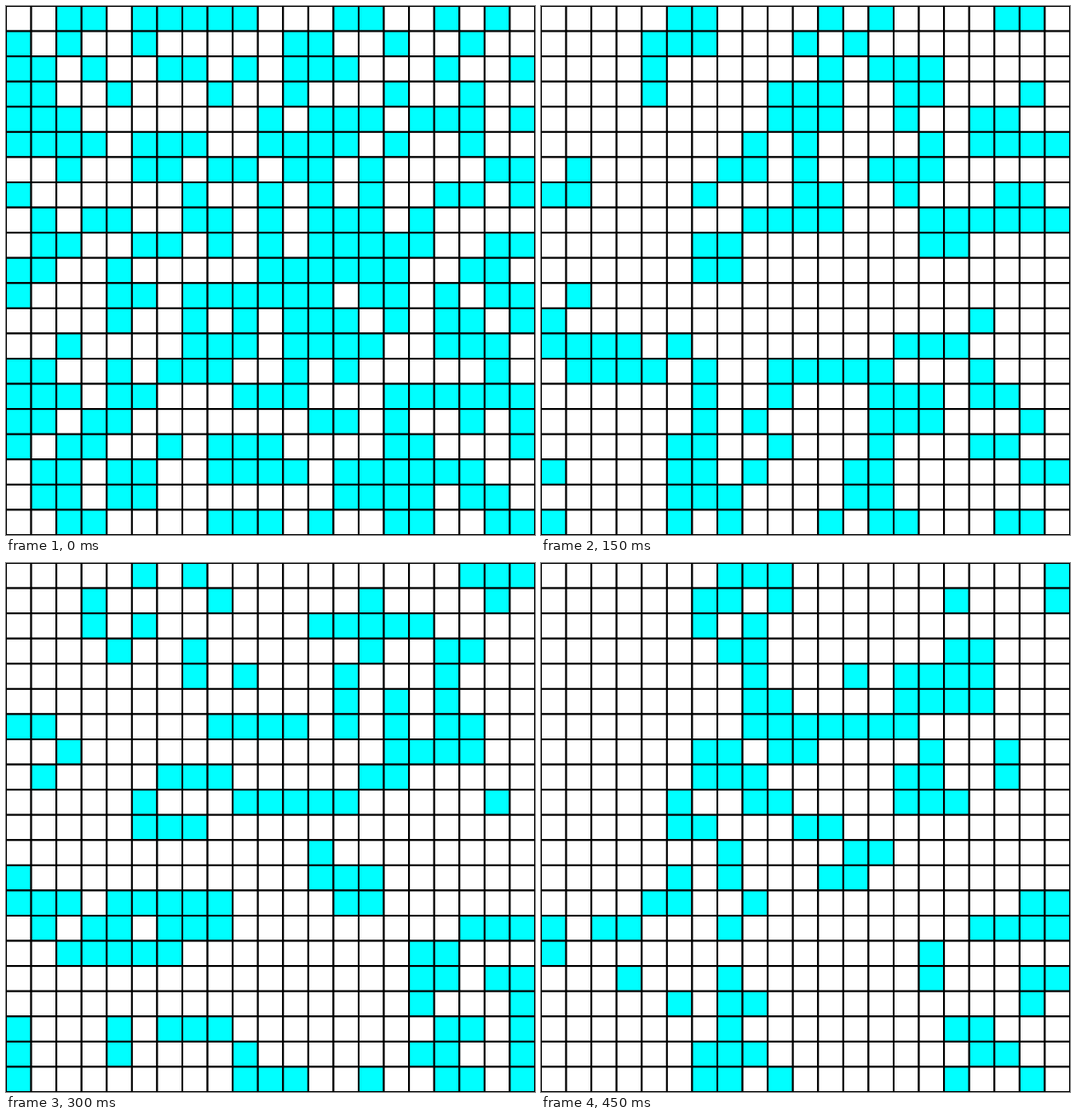
An HTML page with a canvas that plays this animation: 600 px wide and 600 px high, repeating every 0.5 s.

```html
<!DOCTYPE html>
<html lang="en">
<head>
<meta charset="utf-8">
<title>Game of Life</title>
<style>
  html, body { margin: 0; width: 100%; height: 100%; overflow: hidden; background: #fff; }
  canvas { display: block; }
</style>
</head>
<body>
<canvas id="stage" width="600" height="600"></canvas>
<script>
const SIZE = 600;
const STEP_MS = 50;
const GENERATIONS = 10;

// Starting population in plain-text Life notation.
const seed = `
..OO.OOOOO...OO..O.O.
O.O..O.....OO..O..O..
OO.O..OO.O.OOO...O..O
OO..O...O..O...O..O..
OOO.......O.OOO.OOO.O
OOOO.OOO..OOOO.O..O..
..O..OO.OO.OO.O....OO
O......O..O.O.O..OO.O
.O.OO..OO.O.OOO.O....
.OO..OO.O.O.OOOOO..OO
OO..O.....OOOOOO..OO.
O...OO.OOOOOO.OO.O.OO
....O..O.O.OOO.O.OO.O
..O....OOO.OOOO..OOO.
OO..O.OOO..O.O.....O.
OOO.OO...OOO...OOOOOO
OO.OO.......OO.O..O.O
O.OO..O.OOO....OO...O
.OO.OO..OOOO.OOOOOO..
.OO.OO.......OOOO.OO.
..OO....OOO.O..OO..OO`;

const ctx = document.getElementById("stage").getContext("2d");
const start = seed.trim().split("\n").map(row => [...row].map(c => c === "O"));
const count = start.length;
const cell = SIZE / count;
const wrap = i => (i + count) % count;

function neighbours(grid, row, col) {
  let total = 0;
  for (let dr = -1; dr <= 1; dr++) {
    for (let dc = -1; dc <= 1; dc++) {
      if ((dr || dc) && grid[wrap(row + dr)][wrap(col + dc)]) total++;
    }
  }
  return total;
}

function evolve(grid) {
  return grid.map((cells, row) => cells.map((alive, col) => {
    const n = neighbours(grid, row, col);
    return n === 3 || (alive && n === 2);
  }));
}

const history = [start];
while (history.length < GENERATIONS) history.push(evolve(history[history.length - 1]));

function draw(grid) {
  ctx.strokeStyle = "#000";
  ctx.lineWidth = 2;
  grid.forEach((cells, row) => cells.forEach((alive, col) => {
    ctx.fillStyle = alive ? "#0ff" : "#fff";
    ctx.fillRect(col * cell, row * cell, cell, cell);
    ctx.strokeRect(col * cell, row * cell, cell, cell);
  }));
}

let origin = null;
let shown = -1;

function tick(now) {
  if (origin === null) origin = now;
  const generation = Math.floor((now - origin) / STEP_MS) % GENERATIONS;
  if (generation !== shown) {
    shown = generation;
    draw(history[generation]);
  }
  requestAnimationFrame(tick);
}

draw(start);
requestAnimationFrame(tick);
</script>
</body>
</html>
```
